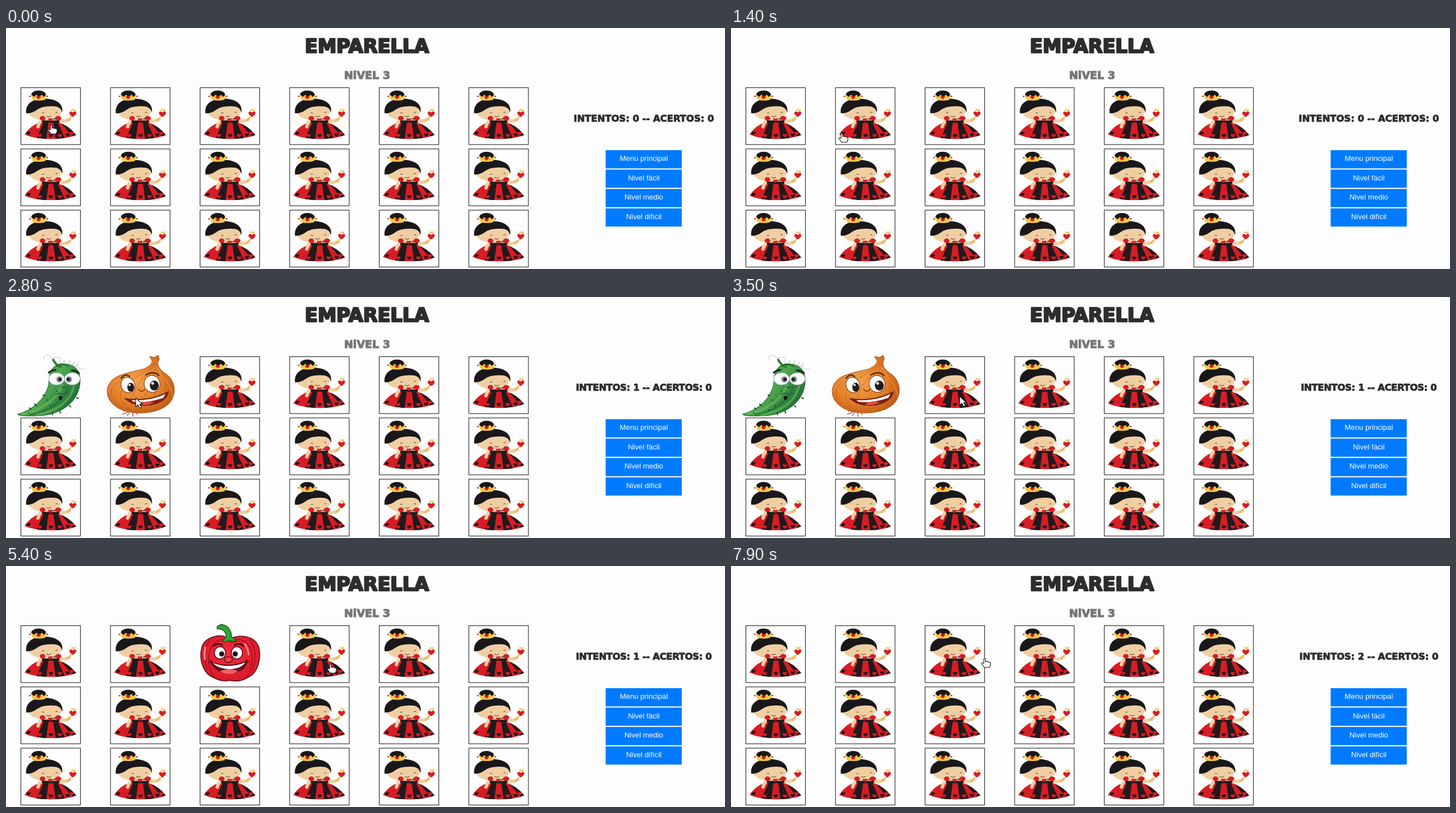
Write an HTML page that moves like this. It is 1280x430 px and loops after 8 s.

```html
<!DOCTYPE html>
<html lang="gl">
<head>
<meta charset="utf-8">
<title>Emparella</title>
<style>
  html, body { margin: 0; width: 100%; height: 100%; overflow: hidden; background: #fdfdfd; }
  svg { display: block; width: 1280px; height: 430px; }
  text { text-anchor: middle; }
  .chunky { font-family: "DejaVu Sans", sans-serif; font-weight: bold; fill: #2d2d2d; stroke: #2d2d2d; stroke-linejoin: round; }
  .button { font: 13.2px "Liberation Sans", Arial, sans-serif; fill: #fff; }
</style>
</head>
<body>
<svg viewBox="0 0 1280 430">
  <defs>
    <linearGradient id="greenSkin" x1="0" y1="0" x2="1" y2=".6">
      <stop offset=".2" stop-color="#2f8a3c"/><stop offset=".55" stop-color="#4fa950"/><stop offset="1" stop-color="#1d6b35"/>
    </linearGradient>
    <radialGradient id="orangeSkin" cx=".42" cy=".45" r=".62">
      <stop offset="0" stop-color="#f3a04a"/><stop offset=".6" stop-color="#e5812c"/><stop offset="1" stop-color="#c15c17"/>
    </radialGradient>
    <radialGradient id="redSkin" cx=".5" cy=".4" r=".65">
      <stop offset="0" stop-color="#f22d3c"/><stop offset="1" stop-color="#d81728"/>
    </radialGradient>
    <path id="heart" d="M0 3C-7 -1 -3 -5 0 -2C3 -5 7 -1 0 3Z"/>
    <clipPath id="skirtShape"><path d="M7 84Q18 67 36 62H66Q86 68 99 85Q82 92 54 92Q25 92 7 84Z"/></clipPath>

    <!-- Card back -->
    <g id="queen">
      <rect x=".5" y=".5" width="106" height="101.5" fill="#fefefe" stroke="#222" stroke-width="1.1"/>
      <g clip-path="url(#skirtShape)">
        <path d="M0 55H106V100H0Z" fill="#d91c24"/>
        <path d="M42 60L25 98H45L50 60ZM58 60L63 98H82L65 60ZM69 60L96 92L108 84L80 60Z" fill="#201a1d"/>
        <g fill="#201a1d">
          <use href="#heart" x="14" y="82"/><use href="#heart" x="54" y="86"/><use href="#heart" x="84" y="85"/>
        </g>
        <g fill="#d91c24">
          <use href="#heart" x="34" y="86"/><use href="#heart" x="70" y="86"/><use href="#heart" x="91" y="82"/>
        </g>
      </g>
      <path d="M39 58Q33 62 31 70M69 60Q80 61 87 57" fill="none" stroke="#efcfa2" stroke-width="6" stroke-linecap="round"/>
      <path d="M82 60L94 49" stroke="#e8b83c" stroke-width="2"/>
      <use href="#heart" transform="translate(93 48) scale(1.6)" fill="#d91c24"/>
      <path d="M90 42L92 39L94 42L97 39L97 43" fill="none" stroke="#e8b83c" stroke-width="1.3"/>
      <path d="M38 54H69V63H38Z" fill="#201a1d"/>
      <ellipse cx="43" cy="42" rx="30" ry="16.5" fill="#efcfa2"/>
      <path d="M42 58H66" stroke="#e3c09a" stroke-width="2"/>
      <path d="M10 46C8 29 22 20 42 20C63 20 77 29 74 45Q72 36 63 34Q40 32 29 40Q20 47 10 46Z" fill="#19171a"/>
      <ellipse cx="32" cy="13" rx="13" ry="7.5" fill="#19171a"/>
      <path d="M18 12L24 17L28 13L33 17L38 13L41 17L47 12L44 22Q32 25 21 22Z" fill="#f2c94b"/>
      <use href="#heart" x="32" y="18" fill="#d91c24"/>
      <path d="M15 16H18M46 16H49" stroke="#c24b2d" stroke-width="2.4"/>
      <ellipse cx="39" cy="55" rx="5" ry="4" fill="#d91c24"/><ellipse cx="67" cy="55" rx="5.5" ry="4" fill="#d91c24"/>
      <use href="#heart" x="53" y="58" fill="#d91c24"/>
      <path d="M38 46Q40 44 42 46M62 45Q64 43 66 45M46 51Q50 54 54 51" fill="none" stroke="#49332b"/>
    </g>

    <!-- Picture faces are drawn in the first column -->
    <g id="cucumber" fill="none" stroke-linecap="round">
      <path d="M68 112C64 103 77 102 80 107C88 112 91 104 97 109C92 122 104 121 105 114C102 109 100 119 108 120C116 120 116 112 112 114C108 122 119 124 123 117C120 113 114 126 126 124C132 119 127 117 125 122C127 126 133 130 139 128" stroke="#adb4c2" stroke-width=".8"/>
      <path d="M21 209C47 202 70 182 76 156C77 134 80 121 101 120C122 119 132 130 132 150C131 187 97 212 54 212C38 213 19 212 21 209Z" fill="url(#greenSkin)" stroke="#1b5b2b"/>
      <path d="M28 209C60 204 90 184 100 157M55 210C90 205 114 186 121 160" stroke="#76bd60" stroke-width="4" opacity=".55"/>
      <path d="M43 210C75 205 102 186 111 160" stroke="#1c6432" stroke-width="3" opacity=".6"/>
      <path d="M98 125Q89 122 84 112" stroke="#347e35" stroke-width="4"/>
      <path d="M90 123Q99 117 111 123" stroke="#266c32" stroke-width="3"/>
      <path d="M69 176L66 175M54 194L51 191M44 200L42 198M126 180L129 181M113 194L115 196M96 204L97 207M82 207L83 210M40 207H41M67 202H68M78 194H79M90 168H91M109 172H110M73 184H74" stroke="#174f2a" stroke-width="2"/>
      <ellipse cx="90" cy="146" rx="14" ry="11" fill="#fff" stroke="#9eabb0"/>
      <ellipse cx="118" cy="146" rx="14" ry="11" fill="#fff" stroke="#9eabb0"/>
      <circle cx="95" cy="147" r="5.5" fill="#899096"/><circle cx="112" cy="147" r="5.5" fill="#899096"/>
      <circle cx="96" cy="147" r="3" fill="#1c2023"/><circle cx="111" cy="147" r="3" fill="#1c2023"/>
      <path d="M76 135Q80 131 88 130M117 131Q125 131 130 136" stroke="#17231b" stroke-width="3"/>
      <path d="M99 160Q103 164 107 160M89 174Q95 169 102 174" stroke="#195428" stroke-width="1.5"/>
      <ellipse cx="97" cy="180" rx="3" ry="3.5" fill="#111"/>
    </g>

    <g id="onion" transform="translate(-159.5 0)" fill="none" stroke-linecap="round">
      <path d="M222 200Q215 208 207 209M223 200L216 212M225 200L226 213M227 200L234 210M221 200L209 204" stroke="#7d4a27" stroke-width="1.2"/>
      <path d="M256 106L264 108L271 104L273 111C267 121 273 127 280 134C303 146 306 176 288 192C267 211 216 212 195 195C175 181 175 155 196 143C222 129 258 133 260 114Z" fill="url(#orangeSkin)" stroke="#a64c12"/>
      <g stroke="#b55a19" opacity=".65">
        <path d="M262 118C248 140 184 139 187 174C189 190 205 198 222 202M264 118C250 142 203 145 204 179Q207 195 223 203M265 118C252 146 223 150 223 203M266 118C265 144 247 184 226 204M268 118C272 147 278 186 229 205M269 121C288 147 303 182 235 205"/>
        <path d="M261 115C239 142 196 138 181 169M267 124C280 145 298 161 297 181" stroke="#fac179"/>
      </g>
      <g stroke="#67320e">
        <ellipse cx="217" cy="157" rx="12" ry="14" fill="#fff" transform="rotate(-20 217 157)"/>
        <ellipse cx="260" cy="155" rx="14" ry="15" fill="#fff" transform="rotate(-18 260 155)"/>
        <path d="M205 145Q213 135 220 142M249 139Q263 131 272 140" stroke="#522a10" stroke-width="2.4"/>
        <path d="M236 164Q241 172 247 165" stroke-width="1.4"/>
        <path d="M211 181Q252 188 289 169C287 193 235 203 213 182Z" fill="#8c1716" stroke-width="1.5"/>
        <path d="M223 184Q256 186 284 173L280 180Q251 190 227 187Z" fill="#fff" stroke="none"/>
        <path d="M238 192Q251 183 264 188Q252 195 238 192Z" fill="#e34d49" stroke="none"/>
      </g>
      <ellipse cx="222" cy="161" rx="6" ry="8" fill="#201b18"/><ellipse cx="264" cy="158" rx="8" ry="9" fill="#201b18"/>
      <circle cx="220" cy="157" r="2" fill="#fff"/><circle cx="261" cy="154" r="2.5" fill="#fff"/>
    </g>

    <g id="pepper" transform="translate(-319 0)" fill="none" stroke="#541018" stroke-width="1.5" stroke-linecap="round">
      <path d="M397 130C383 119 356 126 349 143C342 169 352 193 371 200Q385 207 398 204Q416 208 430 199C449 192 455 163 450 145C444 125 419 121 397 130Z" fill="url(#redSkin)"/>
      <path d="M391 132C360 127 353 170 370 199M403 132C438 123 447 168 429 199M362 132Q348 155 358 184M434 131Q450 154 439 185M397 134Q405 137 410 134" stroke="#9c101d"/>
      <path d="M355 145Q352 157 354 166M425 139Q431 147 432 158" stroke="#ff8890" stroke-width="3"/>
      <path d="M376 108L383 104C397 106 401 117 402 127L410 133Q403 136 397 133Q391 137 385 134L392 127C392 117 386 112 376 112Z" fill="#32a537" stroke="#17581f"/>
      <ellipse cx="381" cy="155" rx="10" ry="11" fill="#fff"/><ellipse cx="411" cy="155" rx="10" ry="11" fill="#fff"/>
      <circle cx="384" cy="157" r="4" fill="#171717"/><circle cx="408" cy="157" r="4" fill="#171717"/>
      <path d="M369 143Q376 136 385 141M407 141Q416 136 423 143" stroke="#3e0911" stroke-width="2.5"/>
      <path d="M364 171Q397 184 430 169C426 196 377 200 364 171Z" fill="#68101a"/>
      <path d="M368 173Q397 184 426 172Q418 184 397 184Q377 183 368 173Z" fill="#fff" stroke="none"/>
      <path d="M381 188Q398 180 413 188Q398 197 381 188Z" fill="#ef6067" stroke="none"/>
      <path d="M360 172L367 168M427 167L433 171"/>
      <ellipse cx="396" cy="167" rx="7" ry="5" fill="#f23c49"/>
    </g>

    <path id="arrow" d="M0 0V16L4 12.5L7 18.5L10 17L7 11.5H12Z"/>
    <path id="hand" d="M-1 1Q0 -1 2 1V6Q4 4 5 6Q7 5 8 7Q11 6 11 9V12L9 16H0L-5 9Q-5 6 -1 9Z"/>
  </defs>

  <rect width="1280" height="430" fill="#fdfdfd"/>
  <text class="chunky" x="642.5" y="43.5" font-size="33.5" stroke-width="2.6">EMPARELLA</text>
  <text class="chunky" x="643" y="91.3" font-size="19" stroke-width="1.2" style="fill:#777;stroke:#777">NiVEL 3</text>
  <text class="chunky" id="score" x="1135.5" y="167" font-size="16.4" stroke-width=".9"></text>
  <g id="menu"></g>
  <g id="cards"></g>
  <use id="cursor" fill="#fff" stroke="#111" stroke-width="1.1" stroke-linejoin="round"/>
</svg>

<script>
const LOOP = 8000, STEP = 100;
const COL = 159.5, ROW = 109.25, LEFT = 26, TOP = 106;
const byId = id => document.getElementById(id);

function add(parent, tag, attrs, text = '') {
  const node = document.createElementNS('http://www.w3.org/2000/svg', tag);
  for (const name in attrs) node.setAttribute(name, attrs[name]);
  node.textContent = text;
  return parent.appendChild(node);
}

['Menu principal', 'Nivel fácil', 'Nivel medio', 'Nivel difícil'].forEach((label, i) => {
  const y = 218 + i * 34.6;
  add(byId('menu'), 'rect', { x: 1067.5, y, width: 135.5, height: 32.5, fill: '#007bff' });
  add(byId('menu'), 'text', { x: 1135.5, y: y + 19, class: 'button' }, label);
});

const backs = Array.from({ length: 18 }, (_, i) =>
  add(byId('cards'), 'use', { href: '#queen', x: LEFT + i % 6 * COL, y: TOP + Math.floor(i / 6) * ROW }));

const turns = [
  { card: 0, face: 'cucumber', open: 1700, close: 4100 },
  { card: 1, face: 'onion', open: 2600, close: 4100 },
  { card: 2, face: 'pepper', open: 4900, close: 7400 },
  { card: 3, face: 'cucumber', open: 5900, close: 7400 },
];
for (const turn of turns)
  turn.node = add(byId('cards'), 'use', { href: '#' + turn.face, x: turn.card * COL });

// time, x, y of the pointer tip
const path = [
  [0, 80, 173], [700, 80, 173], [1400, 197, 188], [2300, 223, 180], [2700, 223, 180], [3500, 407, 177],
  [4700, 407, 177], [5400, 577, 175], [6800, 579, 176], [7400, 579, 176], [7900, 451, 165], [8000, 451, 165],
];

function pointerAt(t) {
  const i = path.findIndex(p => p[0] > t);
  const [t0, x0, y0] = path[i - 1], [t1, x1, y1] = path[i];
  const k = (t - t0) / (t1 - t0), ease = k * k * (3 - 2 * k);
  return [x0 + (x1 - x0) * ease, y0 + (y1 - y0) * ease];
}

function draw(t) {
  let shown = 0;
  for (const { card, open, close, node } of turns) {
    const visible = t >= open && t < close;
    shown += visible;
    node.style.display = visible ? '' : 'none';
    backs[card].style.display = visible ? 'none' : '';
  }

  const tries = (t >= turns[1].open) + (t >= turns[3].open);
  byId('score').textContent = `INTENTOS: ${tries} -- ACERTOS: 0`;
  byId('score').style.letterSpacing = [0, -.32, -.1][tries] + 'px';

  const [x, y] = pointerAt(t);
  const overCard = (x - LEFT) % COL < 107;
  byId('cursor').setAttribute('href', overCard && shown < 2 ? '#hand' : '#arrow');
  byId('cursor').setAttribute('transform', `translate(${x} ${y})`);
}

function tick() {
  draw(Math.floor(performance.now() % LOOP / STEP) * STEP);
  requestAnimationFrame(tick);
}
tick();
</script>
</body>
</html>
```
